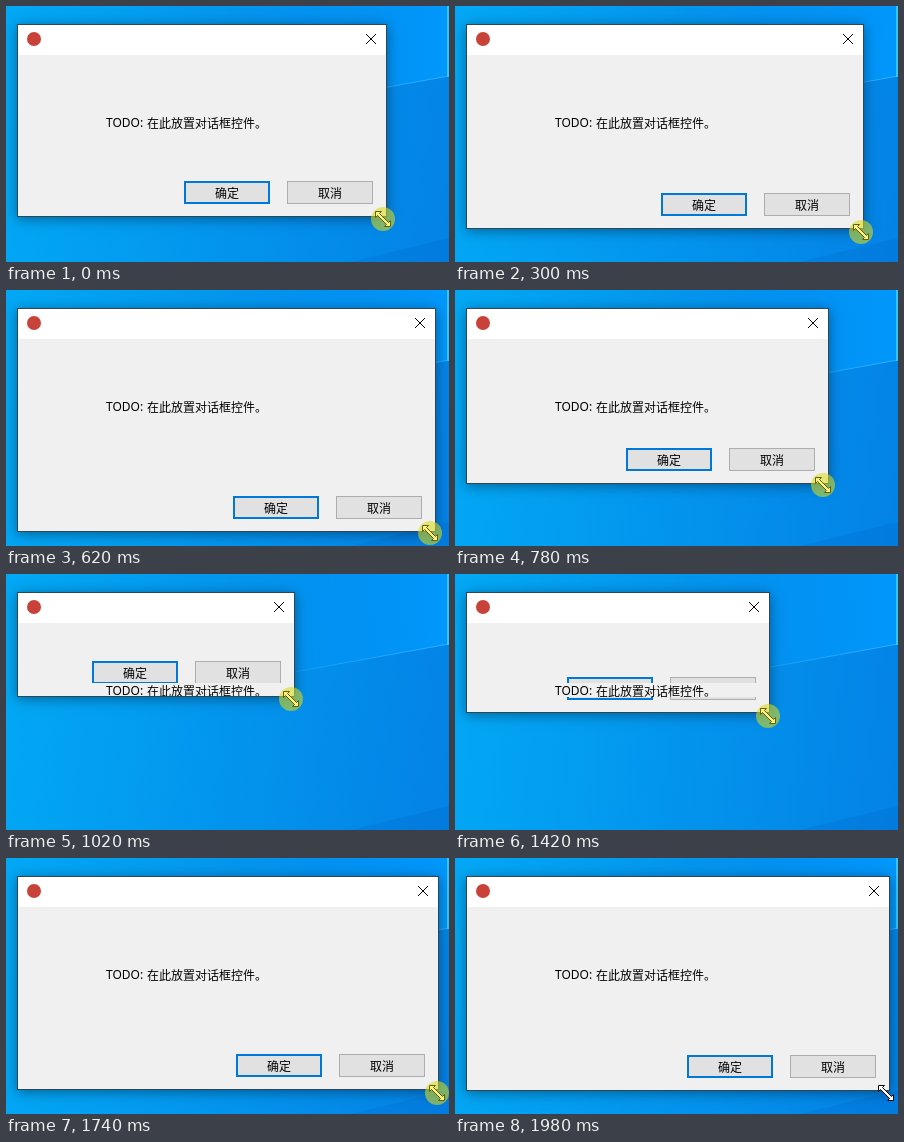
Write an HTML page with a canvas that moves like this. It is 443x256 px and loops after 2.14 s.

```html
<!DOCTYPE html>
<html lang="zh-CN">
<head>
<meta charset="utf-8">
<title>Dialog resize</title>
<style>
html, body { margin: 0; width: 100%; height: 100%; overflow: hidden; background: #0594e9; }
canvas { display: block; width: 100vw; height: 100vh; }
</style>
</head>
<body>
<canvas id="stage" width="443" height="256"></canvas>
<script>
const W = 443, H = 256, LOOP = 2140, LEFT = 11, TOP = 18;
const STEP = 80, PHASE = 60, LEAD = 5, RELEASE = 1980;
const FONT = '12px "Noto Sans", "Noto Sans CJK SC", sans-serif';
const ctx = document.getElementById('stage').getContext('2d');

// key points of the dragged corner: time, x, y, ease-in power
const path = [
  [150, 381, 211],
  [300, 409, 223],
  [460, 435, 246],
  [620, 430, 242],
  [1020, 289, 123],
  [1180, 289, 123],
  [1420, 315, 139, 2],
  [1580, 378, 186],
  [1745, 435, 233]
];

function cornerAt(t) {
  const i = path.findIndex(p => p[0] >= t);
  if (i === 0) return path[0].slice(1, 3);
  if (i < 0) return path[path.length - 1].slice(1, 3);
  const [t0, x0, y0] = path[i - 1], [t1, x1, y1, power = 1] = path[i];
  const u = ((t - t0) / (t1 - t0)) ** power;
  return [Math.round(x0 + (x1 - x0) * u), Math.round(y0 + (y1 - y0) * u)];
}

function rect(x, y, w, h, color) {
  ctx.fillStyle = color;
  ctx.fillRect(x, y, w, h);
}

function poly(points, fill) {
  ctx.beginPath();
  points.forEach(([x, y]) => ctx.lineTo(x, y));
  ctx.closePath();
  ctx.fillStyle = fill;
  ctx.fill();
}

function line(x0, y0, x1, y1, color) {
  ctx.strokeStyle = color;
  ctx.lineWidth = 1;
  ctx.beginPath();
  ctx.moveTo(x0, y0);
  ctx.lineTo(x1, y1);
  ctx.stroke();
}

function disc(x, y, r, color) {
  ctx.fillStyle = color;
  ctx.beginPath();
  ctx.arc(x, y, r, 0, Math.PI * 2);
  ctx.fill();
}

function label(text, x, y, align = 'left') {
  ctx.font = FONT;
  ctx.textAlign = align;
  ctx.fillStyle = '#000';
  ctx.fillText(text, x, y);
}

function fade(x0, y0, x1, y1, from, to) {
  const g = ctx.createLinearGradient(x0, y0, x1, y1);
  g.addColorStop(0, from);
  g.addColorStop(1, to);
  return g;
}

function desktop() {
  rect(0, 0, W, H, fade(0, 130, W, 190, '#02a7f5', '#0383e6'));
  // light beam above the slanted edge, shade in the lower corner
  poly([[150, 0], [W, 0], [W, 70], [150, 123]],
    fade(230, 0, W, 0, 'rgba(0,150,255,0)', 'rgba(0,155,255,.85)'));
  line(200, 114, W, 70, fade(200, 0, W, 0, 'rgba(60,190,255,0)', 'rgba(60,190,255,.7)'));
  poly([[345, H], [W, 232], [W, H]], 'rgba(0,100,200,.25)');
  rect(441, 0, 2, 71, '#35c4fb');
}

function button(x, y, text, main) {
  const edge = main ? 2 : 1;
  rect(x, y, 86, 23, main ? '#0078d7' : '#adadad');
  rect(x + edge, y + edge, 86 - 2 * edge, 23 - 2 * edge, '#e1e1e1');
  label(text, x + 43, y + 17, 'center');
}

function dialog(right, bottom) {
  const w = right - LEFT, h = bottom - TOP;
  ctx.save();
  ctx.shadowColor = 'rgba(0,0,0,.4)';
  ctx.shadowBlur = 12;
  ctx.shadowOffsetY = 2;
  rect(LEFT, TOP, w, h, '#2c4655');
  ctx.restore();

  rect(LEFT + 1, TOP + 1, w - 2, h - 2, '#f0f0f0');
  rect(LEFT + 1, TOP + 1, w - 2, 30, '#fff');
  disc(28, 33, 7, '#c9423a');

  const x = right - 16, y = 33;
  line(x - 5, y - 5, x + 5, y + 5, '#000');
  line(x + 5, y - 5, x - 5, y + 5, '#000');

  ctx.save();
  ctx.beginPath();
  ctx.rect(LEFT + 1, 49, w - 2, bottom - 50);
  ctx.clip();
  button(right - 203, bottom - 36, '确定', true);
  button(right - 100, bottom - 36, '取消', false);
  rect(50, 109, 262, 14, '#f0f0f0');
  label('TODO:', 100, 121);
  label('在此放置对话框控件。', 141, 122);
  ctx.restore();
}

function pointer(x, y, held) {
  if (held) disc(x, y, 12, 'rgba(215,218,25,.58)');
  const half = [[-5.5, -3.5], [-7.5, -1.5], [-7.5, -7.5], [-1.5, -7.5], [-3.5, -5.5]];
  const shape = half.concat(half.map(([a, b]) => [-a, -b]));
  poly(shape.map(([a, b]) => [x + a, y + b]), held ? '#fff084' : '#fff');
  ctx.strokeStyle = held ? '#625f08' : '#000';
  ctx.lineWidth = 1;
  ctx.stroke();
}

function draw(now) {
  const t = now % LOOP;
  const tick = Math.floor((t - PHASE) / STEP) * STEP + PHASE;
  const [right, bottom] = cornerAt(tick);
  const [px, py] = cornerAt(tick + LEAD);
  desktop();
  dialog(right, bottom);
  pointer(px - 4, py + 2, t < RELEASE);
}

const start = performance.now();
function frame() {
  draw(performance.now() - start);
  requestAnimationFrame(frame);
}
frame();
</script>
</body>
</html>
```
